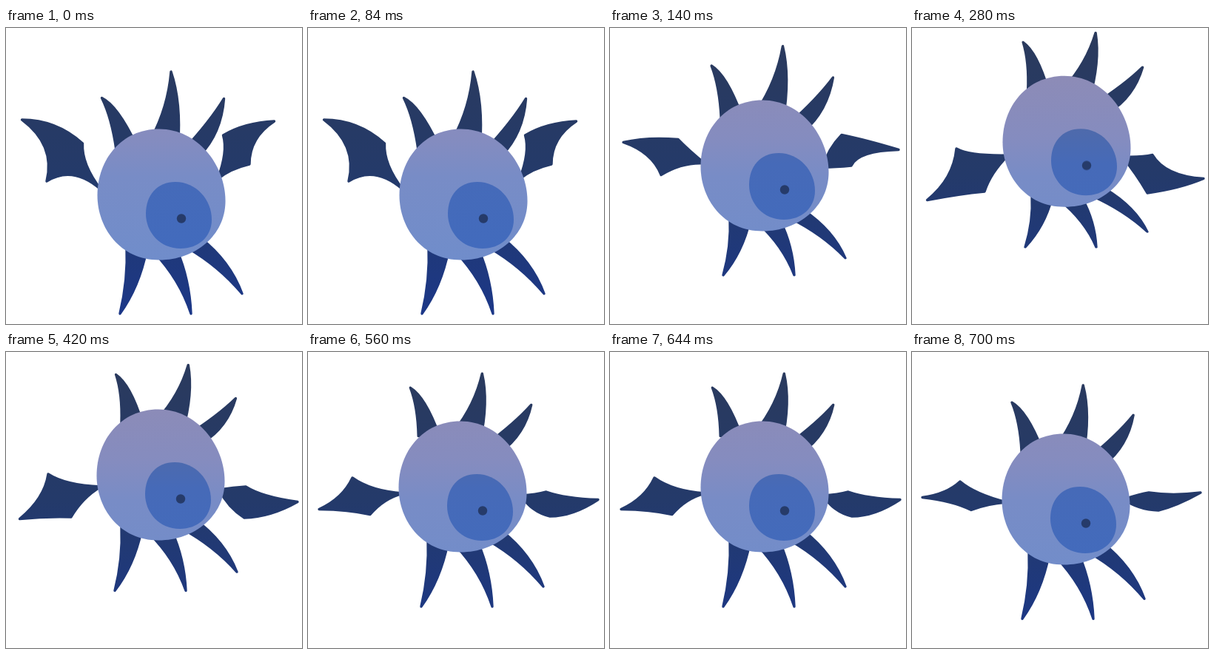
Write an HTML page without scripts that moves like this. It is 400 by 400 pixels and loops after 840 ms.

```html
<!DOCTYPE html>
<html lang="en">
<head>
<meta charset="utf-8">
<title>Flying eyeball</title>
<style>
  html, body { margin: 0; width: 100%; height: 100%; overflow: hidden; background: #fff; }
  svg { display: block; width: 100%; height: 100%; }

  .move { animation: 840ms step-end infinite; }
  .limb { fill: #fff; stroke: #fff; stroke-width: 3.4; stroke-linejoin: round; }
  .body { animation-name: bob; }
  .horns { animation-name: horns; transform-origin: 210px 225px; }
  .legs { animation-name: legs; transform-origin: 154px 387px; }
  .left { animation-name: left; }
  .right { animation-name: right; }

  @keyframes bob {
    0%, 100% { transform: none; }
    16.66% { transform: translate(-1px, -39px); }
    33.33% { transform: translate(-1px, -71.7px); }
    49.99% { transform: translate(-1px, -59px); }
    66.66% { transform: translate(-1px, -43px); }
    83.33% { transform: translate(-2px, -26px); }
  }
  /* Horns swing and squash around the eye, legs squash towards their tips */
  @keyframes horns {
    0%, 100% { transform: none; }
    16.66% { transform: translate(-4.4px, -38px) rotate(5.2deg) scaleY(.99); }
    33.33% { transform: translate(-4.4px, -74.7px) rotate(11.5deg) scaleY(.9); }
    49.99% { transform: translate(-4.1px, -66.6px) rotate(10.9deg) scaleY(.88); }
    66.66% { transform: translate(-7.6px, -49.6px) rotate(7.7deg) scaleY(.9); }
    83.33% { transform: translate(-6.6px, -29.5px) rotate(5.6deg) scaleY(.92); }
  }
  @keyframes legs {
    0%, 100% { transform: none; }
    16.66% { transform: translate(-1px, -52px) scaleY(.86); }
    33.33% { transform: translate(-1px, -90px) scaleY(.77); }
    49.99% { transform: translate(-7px, -63.5px) scaleY(.94); }
    66.66% { transform: translate(-1px, -42px); }
    83.33% { transform: translate(-5px, -25.5px); }
  }
  /* Wing outline order: tip, knuckle, root, lower corner */
  @keyframes left {
    0%, 100% { d: path("M21.5 124Q68 124 103.5 156Q102 184 128 218Q90 185 55 207Q67 158 21.5 124Z"); }
    16.66% { d: path("M18 154.5Q50 147 92 150.5Q106 165 128 183Q98 181 69 198.5Q57 168 18 154.5Z"); }
    33.33% { d: path("M20.5 232.5Q56 204 60 163Q78 173 130 172Q106 196 98 221Q65 224 20.5 232.5Z"); }
    49.99% { d: path("M18.5 225.5Q52 198 57 165Q80 180 128 182Q103 197 88 223Q53 222 18.5 225.5Z"); }
    66.66% { d: path("M15 212.5Q47 198 60 170Q85 188 128 191Q102 198 84 219.5Q55 213 15 212.5Z"); }
    83.33% { d: path("M14 196.5Q47 192 65 175Q85 192 128 203Q101 205 80 213.5Q55 201 14 196.5Z"); }
  }
  @keyframes right {
    0%, 100% { d: path("M362.5 126Q322 128 293.5 145Q300 167 286 204Q303 190 329 184Q329 148 362.5 126Z"); }
    16.66% { d: path("M390 164.5Q345 151 313 144.5Q294 164 288 188Q305 188 326 186Q335 166 390 164.5Z"); }
    33.33% { d: path("M394 203.5Q342 200 325 171.5Q310 175 284 174Q303 197 318 223Q362 217 394 203.5Z"); }
    49.99% { d: path("M394 202.5Q346 196 324 182Q308 183 288 186Q300 210 322 224Q358 223 394 202.5Z"); }
    66.66% { d: path("M392 199.5Q348 198 322 189Q308 193 288 194Q302 216 327 222Q358 222 392 199.5Z"); }
    83.33% { d: path("M390 190Q352 195 320 190Q308 192 286 199Q306 213 333 214Q358 208 390 190Z"); }
  }
</style>
</head>
<body>
<svg viewBox="0 0 400 400">
  <defs>
    <!-- Shading stays fixed to the stage while the creature moves through it -->
    <linearGradient id="navy" x2="0" y2="400" gradientUnits="userSpaceOnUse">
      <stop offset="0" stop-color="#2b3a5c"/>
      <stop offset=".5" stop-color="#243a6a"/>
      <stop offset="1" stop-color="#1b378a"/>
    </linearGradient>
    <linearGradient id="skin" x2="0" y2="400" gradientUnits="userSpaceOnUse">
      <stop offset=".1" stop-color="#8f8bb4"/>
      <stop offset=".37" stop-color="#858cbf"/>
      <stop offset=".5" stop-color="#788cc6"/>
      <stop offset=".82" stop-color="#6f8dcb"/>
    </linearGradient>
    <linearGradient id="blue" x2="0" y2="400" gradientUnits="userSpaceOnUse">
      <stop offset=".33" stop-color="#4f6aaa"/>
      <stop offset=".46" stop-color="#466ab8"/>
      <stop offset=".75" stop-color="#426bbd"/>
    </linearGradient>

    <mask id="limbs" maskUnits="userSpaceOnUse" x="0" y="0" width="400" height="400">
      <g class="limb">
        <path class="move horns" d="M129.5 94.5Q143 122 149 165L176 158Q151 105 129.5 94.5Z
          M223 59Q219 107 196 150L232.5 160Q237 100 223 59Z
          M294.5 95.5Q276 126 240 165L262 172Q291 142 294.5 95.5Z"/>
        <path class="move legs" d="M154 386Q165 340 163 295L190 300Q180 350 154 386Z
          M250 386Q235 340 200 303L231 300Q248 340 250 386Z
          M319 359Q288 322 245 297L262 283Q303 315 319 359Z"/>
        <path class="move left"/>
        <path class="move right"/>
      </g>
    </mask>
    <clipPath id="ball">
      <path class="move body" d="M207 136.5C258 136.5 296.5 184 296.5 234C296.5 280 256 313.5 207 313.5C154 313.5 123.5 270 123.5 226C123.5 178 156 136.5 207 136.5Z"/>
    </clipPath>
    <clipPath id="iris">
      <path class="move body" d="M229 208C257 208 278 232 278 259C278 282 260 298 236 298C208 298 189 276 189 251C189 226 204 208 229 208Z"/>
    </clipPath>
  </defs>

  <rect width="400" height="400" fill="url(#navy)" mask="url(#limbs)"/>
  <rect width="400" height="400" fill="url(#skin)" clip-path="url(#ball)"/>
  <rect width="400" height="400" fill="url(#blue)" clip-path="url(#iris)"/>
  <circle class="move body" cx="237" cy="257.5" r="6.2" fill="#263b6a"/>
</svg>
</body>
</html>
```
